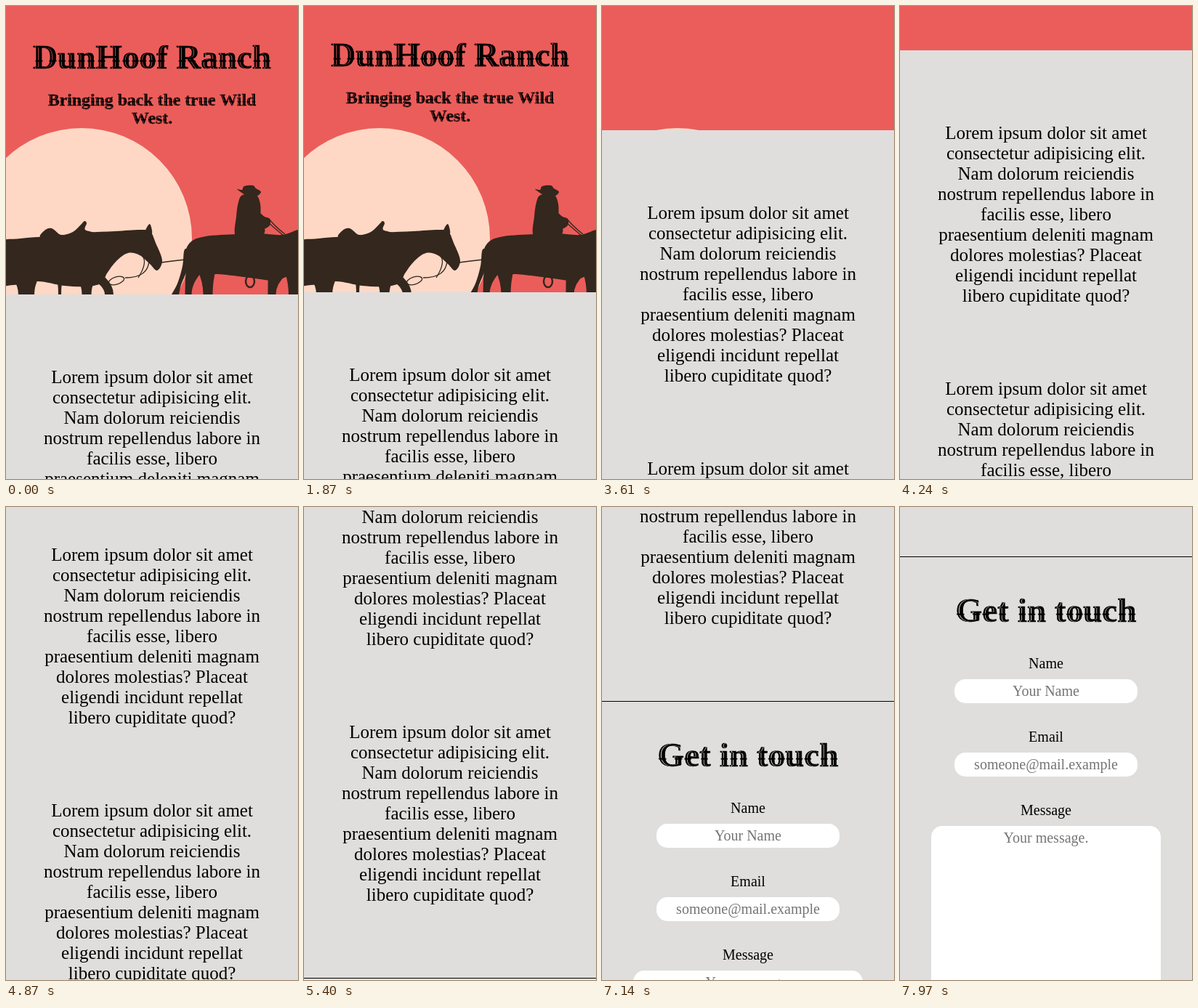
An HTML page with a canvas that plays this animation: 402 by 651 pixels, repeating every 8 s.

```html
<!DOCTYPE html>
<html lang="en">
<head>
<meta charset="utf-8">
<title>Ranch page</title>
<style>
  html, body { margin: 0; width: 100%; height: 100%; overflow: hidden; background: #dfdedd; }
  canvas { display: block; width: 402px; height: 651px; }
</style>
</head>
<body>
<canvas id="stage" width="402" height="651"></canvas>
<script>
const W = 402, H = 651, LOOP = 8000;
const HERO = 397, PAD = 100, LINE = 28, TICK = 69.5;
const RED = '#eb5d5a', SUN = '#fed8c5', DARK = '#33271e', PAPER = '#dfdedd';
const SERIF = '"Liberation Serif", "Times New Roman", serif';
const ctx = document.getElementById('stage').getContext('2d', { alpha: false });

const LOREM = [
  'Lorem ipsum dolor sit amet', 'consectetur adipisicing elit.', 'Nam dolorum reiciendis',
  'nostrum repellendus labore in', 'facilis esse, libero', 'praesentium deleniti magnam',
  'dolores molestias? Placeat', 'eligendi incidunt repellat', 'libero cupiditate quod?'
];
const SECTION = LOREM.length * LINE + PAD;
const RULE = HERO + PAD + 2 * SECTION;

// ---------- scroll ----------
// [time, scroll]; between keys the page moves evenly, once per tick
const KEYS = [[1870, 3], [3610, 226], [4870, 445], [5990, 691], [7140, 934], [7970, 1133]];

function scrollAt(t) {
  if (t < KEYS[0][0]) return t < 600 ? 0 : 2;
  let i = 0;
  while (i < KEYS.length - 2 && t >= KEYS[i + 1][0]) i++;
  const [t0, s0] = KEYS[i], [t1, s1] = KEYS[i + 1];
  const n = Math.round((t1 - t0) / TICK);
  const u = Math.min(1, Math.floor((t - t0) / (t1 - t0) * n + 0.01) / n);
  const eased = i ? u : u ** 1.3;   // gathers speed at the start
  return Math.round(s0 + (s1 - s0) * eased);
}

// ---------- headings ----------
function layer(w, h) {
  const c = document.createElement('canvas');
  c.width = w;
  c.height = h;
  return c.getContext('2d');
}

// Western lettering: bold serif with small spurs on the stems and a thin inline
function western(text, size) {
  const h = Math.ceil(size * 1.5), base = Math.round(size * 1.1);
  const setup = g => {
    g.font = `bold ${size}px ${SERIF}`;
    g.textAlign = 'center';
    g.lineJoin = 'round';
    g.lineWidth = size * 0.015;
    return g;
  };
  const g = setup(layer(W, h)), cut = setup(layer(W, h));
  const put = (c, dx) => c.fillText(text, W / 2 + dx, base);

  put(g, 0);
  g.strokeText(text, W / 2, base);

  put(cut, size * 0.045);
  cut.globalCompositeOperation = 'destination-out';
  put(cut, size * 0.062);
  g.globalCompositeOperation = 'destination-out';
  g.drawImage(cut.canvas, 0, 0);
  g.globalCompositeOperation = 'source-over';

  g.beginPath();
  g.rect(0, base - size * 0.24, W, size * 0.04);
  g.clip();
  put(g, -size * 0.03);
  put(g, size * 0.03);
  return { img: g.canvas, base };
}

const HEADS = [
  [western('DunHoof Ranch', 47), 86],
  [western('Bringing back the true Wild', 23.8), 137],
  [western('West.', 23.8), 162],
  [western('Get in touch', 47.2), RULE + 90]
];

// ---------- hero picture ----------
const hero = layer(W, HERO);

// closed smooth curve through "x,y" points
function blob(text) {
  const p = text.split(' ').map(s => s.split(',').map(Number)), n = p.length;
  const at = i => p[(i + n) % n];
  const handle = (i, k, axis) => at(i)[axis] + k * (at(i + 1)[axis] - at(i - 1)[axis]) / 6;
  hero.beginPath();
  hero.moveTo(...p[0]);
  for (let i = 0; i < n; i++) {
    hero.bezierCurveTo(handle(i, 1, 0), handle(i, 1, 1),
      handle(i + 1, -1, 0), handle(i + 1, -1, 1), ...at(i + 1));
  }
  hero.fill();
}

// tapered leg, cut off by the lower edge
function leg(x, y, w, footX, footW) {
  hero.beginPath();
  hero.moveTo(x - w / 2, y);
  hero.quadraticCurveTo(footX - footW / 2, (y + HERO) / 2, footX - footW / 2, HERO);
  hero.lineTo(footX + footW / 2, HERO);
  hero.quadraticCurveTo(footX + footW / 2, (y + HERO) / 2, x + w / 2, y);
  hero.fill();
}

function rope(x, y, bendX, bendY, endX, endY, w = 1.3) {
  hero.lineWidth = w;
  hero.beginPath();
  hero.moveTo(x, y);
  hero.quadraticCurveTo(bendX, bendY, endX, endY);
  hero.stroke();
}

function disc(x, y, rx, ry, turn = 0) {
  hero.beginPath();
  hero.ellipse(x, y, rx, ry, turn, 0, 7);
}

function packHorse() {
  blob('-10,328 20,320 60,317 110,312 150,310 186,308 199,311 206,326 215,350 208,364 198,355 184,343 168,340 152,351 139,368 132,381 112,386 80,385 44,379 10,384 -10,380');
  blob('49,320 53,309 63,306 76,315 92,311 103,301 108,296 111,299 109,308 122,314 90,328');
  blob('192,310 198,300 201,313');
  leg(27, 374, 36, 28, 22);
  leg(111, 378, 22, 111, 13);
  leg(126, 374, 22, 142, 12);
  leg(74, 380, 6, 74, 4);
  rope(197, 350, 196, 374, 164, 374);
  rope(187, 343, 196, 352, 182, 374);
  rope(203, 336, 201, 344, 193, 350);
  disc(152, 378, 11, 5, -0.3);
  hero.stroke();
  rope(214, 353, 228, 351, 247, 349, 1.6);
}

function leadHorse() {
  blob('246,342 254,325 275,317 318,314 350,313 380,315 402,308 420,306 420,372 392,371 372,378 350,376 320,372 292,369 274,370 256,368 248,358');
  blob('246,335 256,340 250,362 241,384 236,402 226,402 236,382 243,358');
  leg(262, 360, 28, 251, 9);
  leg(276, 362, 26, 278, 13);
  leg(374, 368, 26, 366, 11);
  leg(396, 366, 24, 396, 14);
  disc(336, 379, 6, 8);
  hero.lineWidth = 2.5;
  hero.stroke();
}

function rider() {
  blob('326,260 320,270 317,290 316,316 336,322 356,312 351,290 350,272 344,260');
  blob('346,284 356,290 363,293 363,302 352,308 344,304');
  blob('318,252 325,253 328,248 340,247 344,251 351,256 344,262 330,260');
  rope(360, 297, 370, 306, 382, 316);
  rope(362, 293, 370, 303, 384, 314);
}

hero.fillStyle = RED;
hero.fillRect(0, 0, W, HERO);
hero.fillStyle = SUN;
disc(104, 320, 152, 152);
hero.fill();
hero.fillStyle = hero.strokeStyle = DARK;
packHorse();
leadHorse();
rider();

// ---------- page ----------
function label(text, y, size, color = '#000') {
  ctx.font = `${size}px ${SERIF}`;
  ctx.fillStyle = color;
  ctx.fillText(text, W / 2, y);
}

function field(name, hint, y, x, h) {
  label(name, y, 20);
  ctx.fillStyle = '#fff';
  ctx.beginPath();
  ctx.roundRect(x, y + 15, W - 2 * x, h, 15);
  ctx.fill();
  label(hint, y + 38, 20, '#757575');
}

function draw(t) {
  const s = scrollAt(t), edge = HERO - s;
  ctx.setTransform(1, 0, 0, 1, 0, 0);
  ctx.fillStyle = PAPER;
  ctx.fillRect(0, 0, W, H);
  // the hero picture stays fixed while its window slides up
  if (edge > 0) ctx.drawImage(hero.canvas, 0, 0, W, edge, 0, 0, W, edge);

  ctx.translate(0, -s);
  ctx.textAlign = 'center';
  for (let k = 0; k < 2; k++) {
    const first = HERO + PAD + k * SECTION + 22;
    LOREM.forEach((line, i) => label(line, first + i * LINE, 25));
  }
  ctx.fillStyle = '#000';
  ctx.fillRect(0, RULE, W, 1);
  for (const [head, y] of HEADS) ctx.drawImage(head.img, 0, y - head.base);
  field('Name', 'Your Name', RULE + 154, 75, 33);
  field('Email', 'someone@mail.example', RULE + 255, 75, 33);
  field('Message', 'Your message.', RULE + 356, 43, 320);
}

function tick() {
  draw(performance.now() % LOOP);
  requestAnimationFrame(tick);
}
tick();
</script>
</body>
</html>
```
